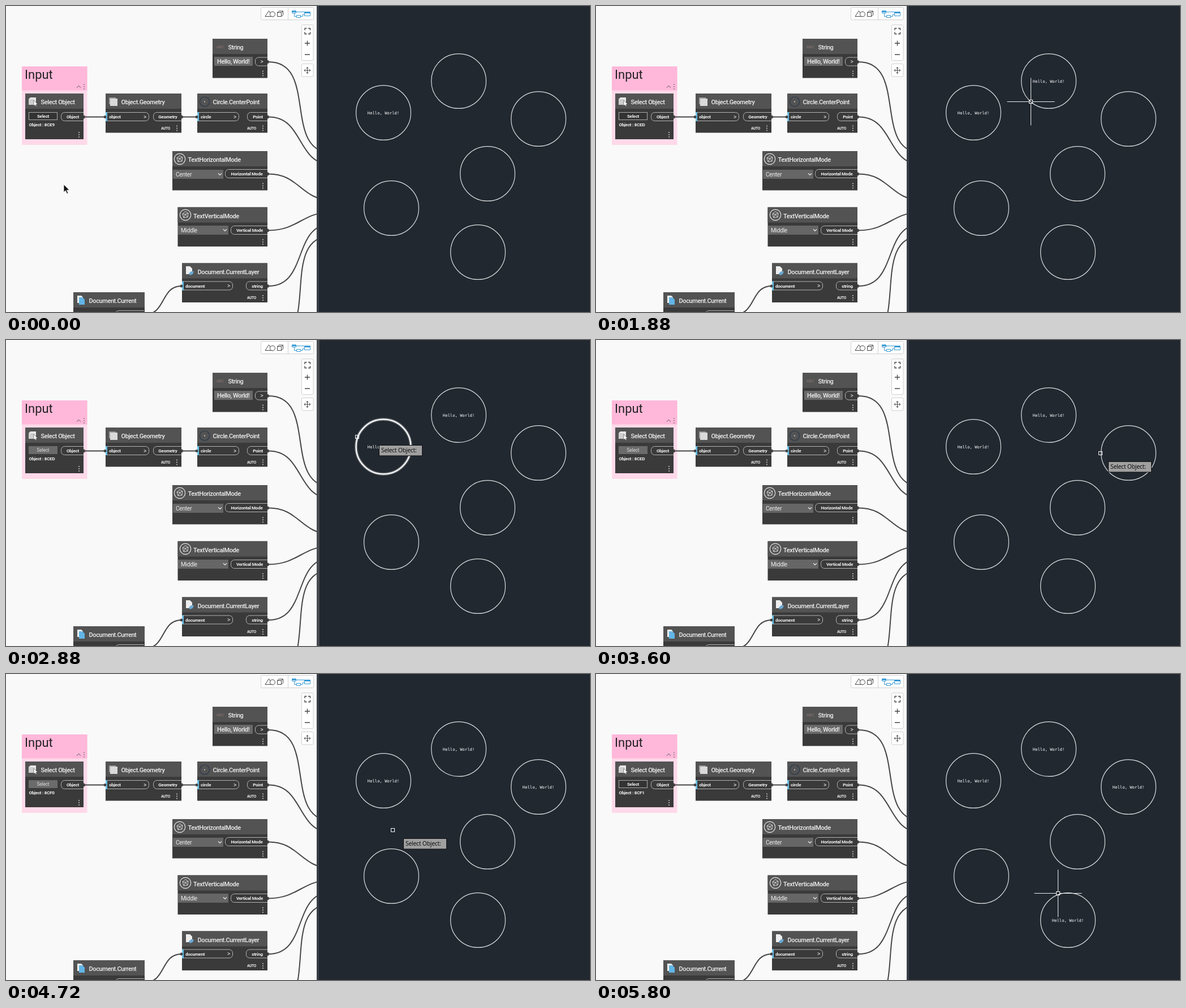
Write an HTML page that moves like this. It is 1032 px wide and 542 px high and loops after 6560 ms.

```html
<!DOCTYPE html>
<html lang="en">
<head>
<meta charset="utf-8">
<title>Node graph and drawing</title>
<style>
  html, body { margin: 0; width: 100%; height: 100%; overflow: hidden; background: #f9f9f9; }
  svg { display: block; width: 100%; height: 100%; font-family: Roboto, sans-serif; }
  text { white-space: pre; }
  .title { font-size: 11px; font-weight: 500; letter-spacing: -.4px; fill: #eee; }
  .value { font-size: 10.2px; letter-spacing: -.3px; fill: #eee; }
  .port { font-size: 8px; font-weight: 700; letter-spacing: -.25px; fill: #f2f2f2; }
  .soft { font-size: 8.2px; letter-spacing: -.1px; fill: #ddd; }
  .auto { font-size: 6.5px; font-weight: 700; letter-spacing: -.3px; fill: #eee; }
  .mid { text-anchor: middle; }
  .cad { font: 7.2px "DejaVu Sans Mono", monospace; fill: #fff; text-anchor: middle; }
  .tip { font: 10.5px "Noto Sans", sans-serif; letter-spacing: -.3px; fill: #111; }
  .line { fill: none; stroke-width: 1; }
</style>
</head>
<body>
<svg id="stage" viewBox="0 0 1032 542" preserveAspectRatio="none"></svg>
<script>
const LOOP = 6560, STEP = 40, R = 48.4;
const circles = [[667, 189], [800, 133], [941, 200], [851, 297], [681, 358], [834, 436]];

// Pointer path: time, x, y
const path = [
  [0, 102, 316], [30, 102, 316], [160, 85, 240], [270, 75, 196], [945, 75, 196],
  [1080, 470, 201], [1160, 640, 222], [1280, 748, 194], [1390, 768, 169], [2030, 768, 169],
  [2200, 440, 186], [2420, 75, 196], [2710, 75, 196], [2800, 300, 170], [2880, 620, 171],
  [2930, 745, 177], [3040, 815, 190], [3360, 883, 199], [3560, 891, 200], [3990, 891, 200],
  [4150, 480, 200], [4340, 75, 196], [4500, 75, 196], [4640, 490, 270], [4680, 592, 275],
  [4720, 683, 275.5], [4880, 745, 290], [5160, 803, 345], [5320, 815, 367], [5400, 816, 388],
  [LOOP, 816, 388]
];
// Each pick: button lit, button clicked, object picked, circle index, new id
const picks = [
  { from: 240, click: 480, done: 1840, circle: 1, id: "8CED" },
  { from: 2400, click: 2640, done: 3720, circle: 2, id: "8CF0" },
  { from: 4320, click: 4360, done: 5760, circle: 5, id: "8CF1" }
];
// Highlight: circle index, start, end
const glows = [[1, 1560, 1800], [0, 2880, 2960], [5, 5400, 5720]];

const text = (x, y, s, cls, more = "") =>
  `<text x="${x}" y="${y}" class="${cls}" ${more}>${s.replace(/>/g, "&gt;")}</text>`;
const rect = (x, y, w, h, fill, more = "") =>
  `<rect x="${x}" y="${y}" width="${w}" height="${h}" fill="${fill}" ${more}/>`;
const line = (d, color, more = "") => `<path d="${d}" class="line" stroke="${color}" ${more}/>`;
const disc = (x, y, r, fill, more = "") => `<circle cx="${x}" cy="${y}" r="${r}" fill="${fill}" ${more}/>`;
const dots = (x, y, color = "#ddd") => [0, 4, 8].map(d => disc(x, y + d, .9, color)).join("");

function node(x, y, w, h, title, auto) {
  return rect(x, y, w, h, "#3a3a3a") + rect(x, y, w, 27, "#535353") +
    text(x + 27.5, y + 19, title, "title") + dots(x + w - 8, y + h - 12) +
    (auto ? text(x + w - 36, y + 63.5, "AUTO", "auto") : "");
}
function output(x, right, y, label) {
  return line(`M${right} ${y - 7.5}H${x + 6.5}a6 6 0 0 0 -6 6v3a6 6 0 0 0 6 6H${right}`, "#b4b4b4") +
    text((x + right) / 2 + 1, y + 3, label, label === ">" ? "value mid" : "port mid") +
    `<path d="M${right} ${y - 2.5}a3 3 0 0 1 0 6z" fill="#454545"/>`;
}
function input(x, right, y, label) {
  return line(`M${x} ${y - 7.5}H${right - 5.5}a6 6 0 0 1 6 6v3a6 6 0 0 1 -6 6H${x}`, "#b4b4b4") +
    rect(x - 1, y - 8, 3, 16, "#6ac0e7") + text(x + 5, y + 3, label, "port") +
    text(right - 9, y + 3.5, ">", "value") + disc(x - 2, y + .5, 2.5, "#454545");
}
function dropdown(x, y, label) {
  return rect(x, y, 89, 16, "#666") + text(x + 5, y + 12, label, "value") +
    line(`M${x + 80} ${y + 6.5}l3 3l3 -3`, "#eee", 'style="stroke-width:1.2"');
}
function modeIcon(x, y) {
  return disc(x, y, 9.7, "none", 'stroke="#e4e4e4" stroke-width="1.2"') +
    line(`M${x - 5} ${y - 2}l5 -4l5 3l-1 7l-7 1zl5 1l5 -2m-5 2l4 5m-4 -5l-3 6`, "#e4e4e4", 'style="stroke-width:.9"');
}
// Connector whose handles reach 45% of the distance between its ends
function wire(x, y, x2, y2) {
  const reach = .45 * Math.hypot(x2 - x, y2 - y);
  return line(`M${x} ${y}C${x + reach} ${y} ${x2 - reach} ${y2} ${x2} ${y2}`, "#454545", 'style="stroke-width:2"');
}
// Starting height and slot on the node hidden behind the drawing
const feeds = [[99, 0], [196.5, 1], [297.5, 4], [397.5, 5], [496, 6], [595, 7]];
const wires = feeds.map(([y, slot]) => wire(464, y, 576, 260 + 21 * slot)).join("") +
  wire(246, 546, 310, 496) + wire(138, 196.5, 176, 196.5) + wire(310, 196.5, 338, 196.5);

function toolbar() {
  const ink = "#444", blue = "#3a9bd5", panel = 'rx="2" stroke="#d0d0d0"';
  return rect(450.5, 2.5, 93, 22, "#fff", panel) + line("M498.5 3V25", "#d0d0d0") +
    line("M458 18.5l6.5 -10l6.5 10z", ink) + disc(471, 14.5, 4.5, "#fff", `stroke="${ink}"`) +
    line("M479.5 11.5h7v7h-7zl3 -2.5h7v7l-3 2.5m0 -7l3 -2.5", ink) +
    line("M505.5 8.5h7v4h-7zM513.5 16.5h7v4h-7zM527.5 10.5h10v7h-10zM513 10.5h14M509.5 13v5.500h4M521 18.5h3v-3h3", blue) +
    rect(506, 9, 6, 2, blue) + rect(528, 11, 9, 2, blue) +
    rect(522.5, 33.5, 20.5, 63, "#fff", panel) + rect(522.5, 102.5, 20.5, 22.5, "#fff", panel) +
    line("M528 43v-3.5h3.5M534 39.5h3.5v3.5M537.5 46v3.5h-3.5M531.5 49.5h-3.5v-3.5M528 66h9M532.5 61.5v9M528 86h9", ink, 'style="stroke-width:1.3"') +
    line("M527 114h11M532.5 108.5v11M530.5 110.5l2 -2l2 2M530.5 117.5l2 2l2 -2M529 112l-2 2l2 2M536 112l2 2l-2 2", ink);
}

const graph =
  rect(28, 107, 115.5, 139, "#ffd9e9") + rect(28, 107, 115.5, 42.5, "#ffb8d9") +
  text(33, 129, "Input", "", 'font-size="22" fill="#222"') +
  line("M125 145l3.5 -4l3.5 4", "#6b5560") + dots(138, 139, "#8a6f7c") + wires +

  node(34, 155, 103, 81, "Select Object") + output(97, 137, 196, "Object") +
  `<path d="M40 165l3 -3h10v10l-3 3h-10z" fill="#e8e8e8"/><path d="M40 165h10v10h-10z" fill="#cfcfcf"/>` +
  `<path d="M49 167v10l2 -2l2 3l1 -1l-1 -3h3z" fill="#fff" stroke="#444" stroke-width=".6"/>` +

  node(176, 155, 134, 69.5, "Object.Geometry", true) + input(177, 252, 196, "object") + output(260, 310, 196, "Geometry") +
  rect(182, 162, 12, 12, "#999") + rect(184, 164, 13, 13, "#d9d9d9") +

  node(338, 155, 124, 69.5, "Circle.CenterPoint", true) + input(339, 411, 196, "circle") + output(426, 462, 196, "Point") +
  disc(351, 169.5, 8.5, "none", 'stroke="#26384c" stroke-width="1.2"') + disc(351, 169.5, 1, "#d5e5f2") +

  node(365, 58, 97, 69.5, "String") + output(440, 462, 98.5, ">") +
  text(372, 74.5, "ABC", "", 'font-size="7" fill="#8b7672"') +
  rect(368, 90, 68, 16, "#6a6a6a") + text(373, 102, "Hello, World!", "title") +

  node(294, 257, 168, 69.5, "TextHorizontalMode") + dropdown(295, 290, "Center") +
  output(387, 462, 297, "Horizontal Mode") + modeIcon(307, 271) +

  node(303.5, 356.5, 158.5, 69.5, "TextVerticalMode") + dropdown(304, 389, "Middle") +
  output(397, 462, 397, "Vertical Mode") + modeIcon(317, 370) +

  node(311, 455.5, 151, 69.5, "Document.CurrentLayer", true) + input(312, 400, 495.5, "document") + output(424, 462, 495.5, "string") +
  `<path d="M318 461h7l4 4v10h-11z" fill="#eee"/><path d="M323 474l4 -4h5l-2 5l-5 2z" fill="#6aa9d2"/>` +

  node(119, 507, 126, 70, "Document.Current") + line("M244 539.5H200q-6 0 -6 6", "#b4b4b4") +
  `<path d="M126 513h7l3 3v10h-10z" fill="#eee"/><path d="M129 516h6l4 4v9h-10z" fill="#62b5e5"/>` +
  toolbar();

const ring = ([x, y], color, width, more = "") =>
  disc(x, y, R, "none", `stroke="${color}" stroke-width="${width}" ${more}`);
const drawing = rect(549, 0, 483, 542, "#212830") + rect(549, 0, 4, 542, "#363d46") +
  circles.map(c => ring(c, "#dcdedf", 1.2)).join("");

const stage = document.getElementById("stage");
stage.innerHTML = rect(0, 0, 1032, 542, "#f9f9f9") + graph + drawing + '<g id="live"></g>';
const live = document.getElementById("live");

const slope = (i, k) => path[i + 1] && path[i] ? (path[i + 1][k] - path[i][k]) / (path[i + 1][0] - path[i][0]) : 0;
function tangent(i, k) {
  const a = slope(i - 1, k), b = slope(i, k);
  return a * b > 0 ? 2 * a * b / (a + b) : 0;
}
// Smooth path position without overshoot
function pointer(t) {
  let i = 0;
  while (i < path.length - 2 && path[i + 1][0] <= t) i++;
  const span = path[i + 1][0] - path[i][0], u = Math.min(1, (t - path[i][0]) / span), v = 1 - u;
  return [1, 2].map(k =>
    path[i][k] * v * v * (1 + 2 * u) + path[i + 1][k] * u * u * (3 - 2 * u) +
    span * u * v * (tangent(i, k) * v - tangent(i + 1, k) * u));
}

function cursor(t, picking) {
  const [x, y] = pointer(t);
  if (x < 553)
    return `<path d="M${x} ${y}v14l3.2 -3l2.5 5.5l2.2 -1l-2.5 -5.3h4.6z" fill="#111" stroke="#fff" stroke-width=".8"/>`;
  const px = Math.round(x) + .5, py = Math.round(y) + .5;
  const box = rect(px - 3, py - 3, 6, 6, "none", 'stroke="#fff"');
  if (!picking)
    return box + line(`M${px - 42} ${py}h39m6 0h39M${px} ${py - 42}v39m0 6v39`, "#eee");
  // The prompt runs slightly ahead of the pick box
  const [mx, my] = pointer(t + 8).map(Math.round);
  return box + rect(mx + 14.5, my + 15.5, 76, 18.5, "#a0a0a0", 'stroke="#111"') +
    text(mx + 18, my + 28, "Select Object:", "tip");
}

function draw(t) {
  const picking = picks.some(p => t >= p.from && t < p.done);
  const focused = picks.some(p => t >= p.click && t < p.click + 280);
  const done = picks.filter(p => t >= p.done);
  const id = done.length ? done[done.length - 1].id : "8CE9";
  const button = picking
    ? rect(40, 188, 51, 14, "#6b6b6b") + text(65.5, 198, "Select", "soft mid")
    : rect(40.5, 188.5, 50, 13, "#333", 'stroke="#aaa"') + text(65.5, 198, "Select", "port mid");
  const labels = [0, ...done.map(p => p.circle)]
    .map(i => text(circles[i][0], circles[i][1] + 3, "Hello, World!", "cad")).join("");
  const glow = glows.filter(g => t >= g[1] && t < g[2]).map(([i]) =>
    ring(circles[i], "#fff", 5, 'opacity=".35"') + ring(circles[i], "#fff", 2)).join("");
  live.innerHTML = (focused ? rect(549, 0, 5, 542, "#484b50") : "") + button +
    text(40.5, 213, "Object : " + id, "port") + labels + glow + cursor(t, picking);
}

const start = performance.now();
let last = -1;
function frame() {
  const t = Math.floor((performance.now() - start) % LOOP / STEP) * STEP;
  if (t !== last) draw(last = t);
  requestAnimationFrame(frame);
}
frame();
</script>
</body>
</html>
```
